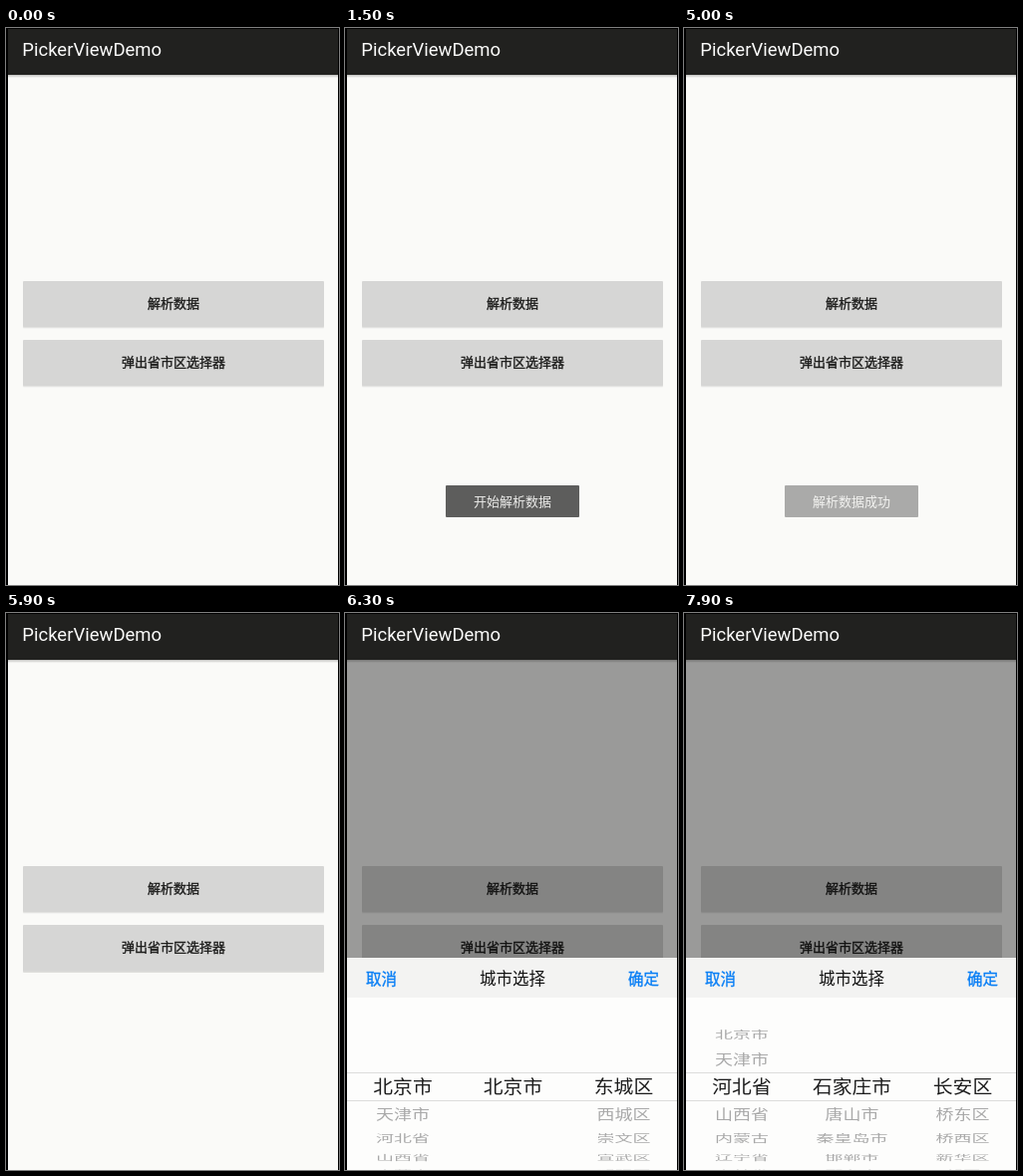
Animation of 334x559 px, one loop 8 s. Source, as an HTML page:

```html
<!DOCTYPE html>
<html lang="zh-CN">
<head>
<meta charset="utf-8">
<title>PickerViewDemo</title>
<style>
  html, body { margin: 0; width: 100%; height: 100%; overflow: hidden; background: #000; }
  svg { display: block; width: 334px; height: 559px; }
  text { font-family: "Noto Sans CJK SC", "Noto Sans CJK", sans-serif; text-anchor: middle; }
  .title { font: 18.5px Roboto, sans-serif; text-anchor: start; fill: #fbfbfa; }
  .btn { font-size: 13px; fill: #1c1c1b; stroke: #1c1c1b; stroke-width: .35px; }
  .toast { font-size: 13px; fill: #ececea; }
  .act { font-size: 15.5px; fill: #0a7ff5; stroke: #0a7ff5; stroke-width: .35px; }
  .head { font-size: 16.5px; fill: #111; }
  .in { font-size: 18px; fill: #1d1d1d; }
  .out { font-size: 18px; fill: #a8a8a8; }
</style>
</head>
<body>
<svg viewBox="0 0 334 559">
  <defs>
    <linearGradient id="drop" x2="0" y2="1">
      <stop offset="0" stop-color="#c0c0be"/>
      <stop offset="1" stop-color="#fafaf8"/>
    </linearGradient>
    <clipPath id="mid"><rect x="2" y="461" width="331" height="28"/></clipPath>
    <clipPath id="rest"><path d="M2 386h331v75H2zM2 489h331v70H2z"/></clipPath>
  </defs>
  <rect x="2" y="1" width="331" height="558" fill="#fafaf8"/>
  <rect x="2" y="47" width="331" height="3" fill="url(#drop)"/>
  <rect x="2" y="1" width="331" height="46" fill="#21211f"/>
  <text class="title" x="16.3" y="28">PickerViewDemo</text>
  <g id="buttons"></g>
  <rect id="dim" x="2" y="47" width="331" height="512" opacity=".384"/>
  <g id="toasts"></g>
  <g id="sheet">
    <rect x="2" y="346" width="331" height="40" fill="#f3f3f2"/>
    <rect x="2" y="386" width="331" height="173" fill="#fdfdfc"/>
    <text class="act" x="36.5" y="372.5">取消</text>
    <text class="head" x="168" y="373">城市选择</text>
    <text class="act" x="299.5" y="372.5">确定</text>
    <path d="M2 461.5h331M2 489.5h331" stroke="#dcdcdb"/>
    <g id="out" clip-path="url(#rest)"></g>
    <g id="in" clip-path="url(#mid)"></g>
  </g>
</svg>
<script>
const LOOP = 8000, STEP = 100;
const CENTER = 475, RADIUS = 89, ANGLE = Math.PI / 10;

const $ = id => document.getElementById(id);
const clamp = x => Math.min(1, Math.max(0, x));
const ramp = (t, from, to) => clamp((t - from) / (to - from));
const easeOut = x => 1 - (1 - x) ** 2;
const smooth = x => x * x * (3 - 2 * x);

function add(parent, tag, attrs, label) {
  const el = document.createElementNS("http://www.w3.org/2000/svg", tag);
  for (const key in attrs) el.setAttribute(key, attrs[key]);
  if (label) el.textContent = label;
  return parent.appendChild(el);
}

function button(y, label) {
  const g = $("buttons");
  add(g, "rect", { x: 17, y: y + 1, width: 302, height: 46, rx: 1, fill: "#e4e4e2" });
  const shade = add(g, "rect", { x: 17, y: y + 2, width: 302, height: 46, rx: 1, fill: "#d8d8d6" });
  add(g, "rect", { x: 17, y, width: 302, height: 46, rx: 1, fill: "#d6d6d5" });
  add(g, "text", { class: "btn", x: 168, y: y + 27 }, label);
  return shade;
}

function toast(label) {
  const g = add($("toasts"), "g", {});
  add(g, "rect", { x: 101, y: 459, width: 134, height: 32, rx: 1, fill: "#5d5d5c" });
  add(g, "text", { class: "toast", x: 168, y: 480 }, label);
  return g;
}

// Each wheel row exists twice: dark in the middle band, grey and flatter outside it.
function wheel(x, names) {
  const rows = names.split(" ").map(name => ["in", "out"].map(c => add($(c), "text", { class: c, y: 6.8 }, name)));
  return (pos, visible = true) => rows.forEach((pair, i) => {
    const a = (i - pos) * ANGLE, c = Math.cos(a);
    const shown = visible && Math.abs(a) < 1.5;
    const y = CENTER + RADIUS * Math.sin(a);
    pair.forEach((el, outer) => {
      el.style.display = shown ? "" : "none";
      if (!shown) return;
      const scale = outer ? [1, 0.8 * c ** 1.5] : [1.1, c];
      el.setAttribute("transform", `translate(${x} ${y}) scale(${scale})`);
    });
  });
}

const shade1 = button(254, "解析数据");
const shade2 = button(313, "弹出省市区选择器");
const toast1 = toast("开始解析数据");
const toast2 = toast("解析数据成功");

const provinces = wheel(58, "北京市 天津市 河北省 山西省 内蒙古 辽宁省 吉林省 黑龙江省");
const before = [wheel(168.5, "北京市"), wheel(279.5, "东城区 西城区 崇文区 宣武区 朝阳区")];
const after = [
  wheel(168.5, "石家庄市 唐山市 秦皇岛市 邯郸市 邢台市"),
  wheel(279.5, "长安区 桥东区 桥西区 新华区 郊区")
];

function draw(t) {
  shade1.style.opacity = t >= 1200 && t < 1500 ? 0.8 : 0.2;
  shade2.style.opacity = t >= 5900 ? 0.8 : 0.2;

  toast1.style.opacity = ramp(t, 1100, 1500) * (1 - ramp(t, 3000, 3300));
  toast2.style.opacity = ramp(t, 3000, 3400) * (1 - ramp(t, 4900, 5100));

  $("dim").style.display = t >= 6000 ? "" : "none";
  const rise = easeOut(ramp(t, 6000, 6300));
  $("sheet").style.display = rise ? "" : "none";
  $("sheet").setAttribute("transform", `translate(0 ${213 * (1 - rise)})`);

  // The drag runs a little past the row, then snaps back.
  provinces(2.35 * smooth(ramp(t, 7200, 7600)) - 0.35 * easeOut(ramp(t, 7600, 7850)));
  const picked = t >= 7900;
  before.forEach(w => w(0, !picked));
  after.forEach(w => w(0, picked));
}

const start = performance.now();
function tick() {
  const t = (performance.now() - start) % LOOP;
  draw(Math.floor(t / STEP) * STEP);
  requestAnimationFrame(tick);
}
tick();
</script>
</body>
</html>
```
